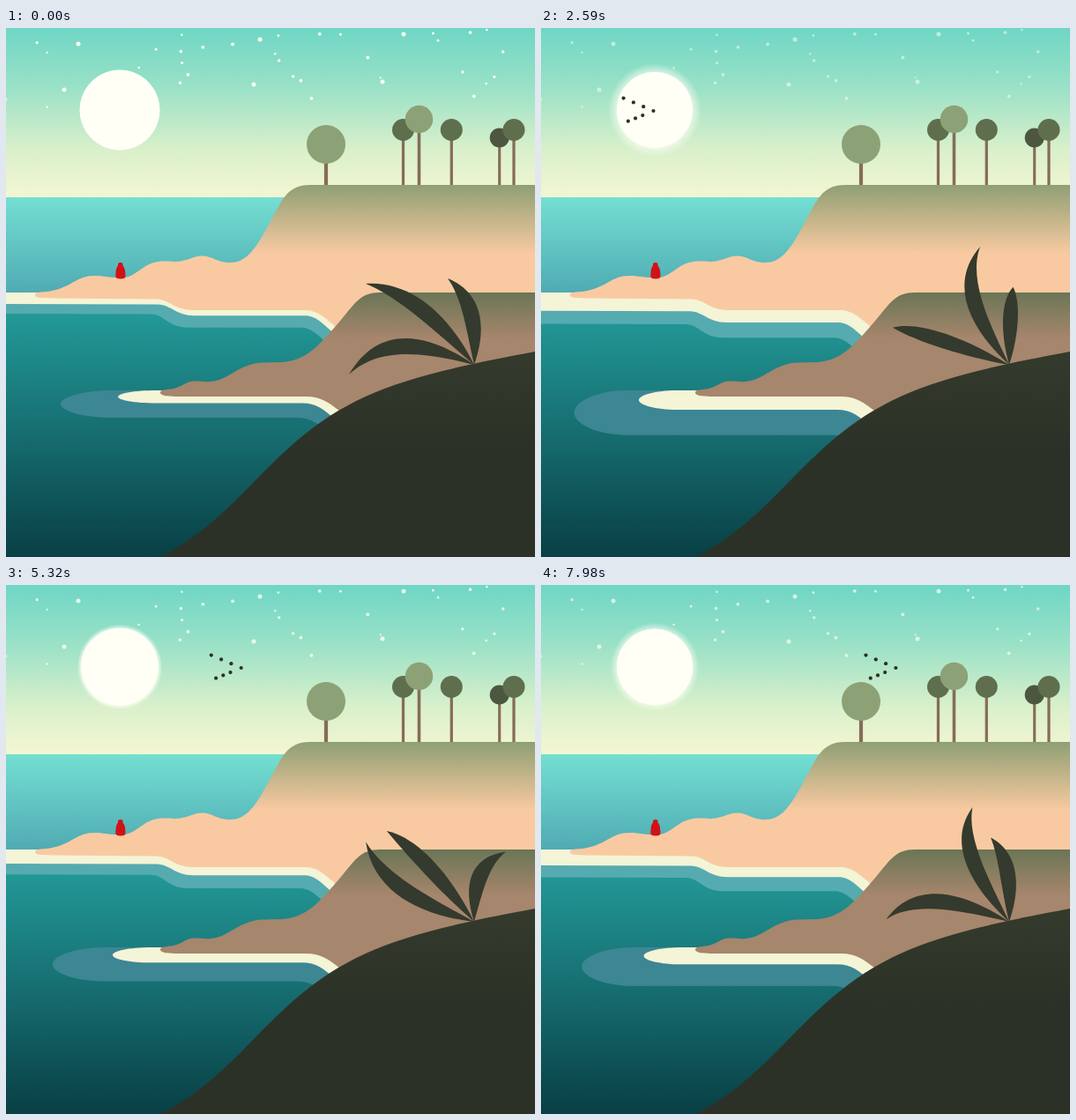
Animation, 600 px wide and 600 px high, one loop 8000 ms. Source, as an HTML page:

```html
<!DOCTYPE html>
<html lang="en">
<head>
<meta charset="utf-8">
<title>Evening coast</title>
<style>
  html, body { margin: 0; width: 100%; height: 100%; overflow: hidden; background: #0a4145; }
  svg { display: block; width: 100vw; height: 100vh; }
</style>
</head>
<body>
<svg viewBox="0 0 600 600">
  <defs>
    <linearGradient id="sky" gradientUnits="userSpaceOnUse" x1="0" y1="0" x2="0" y2="192">
      <stop offset="0" stop-color="#6fd6c5"/>
      <stop offset=".35" stop-color="#9ae1c7"/>
      <stop offset=".72" stop-color="#d9f0cb"/>
      <stop offset="1" stop-color="#f4f6d2"/>
    </linearGradient>
    <linearGradient id="farSea" gradientUnits="userSpaceOnUse" x1="0" y1="192" x2="0" y2="300">
      <stop offset="0" stop-color="#74dfd2"/>
      <stop offset="1" stop-color="#50abb3"/>
    </linearGradient>
    <linearGradient id="nearSea" gradientUnits="userSpaceOnUse" x1="0" y1="320" x2="0" y2="600">
      <stop offset="0" stop-color="#239a98"/>
      <stop offset=".5" stop-color="#166d70"/>
      <stop offset="1" stop-color="#083f44"/>
    </linearGradient>
    <linearGradient id="farLand" gradientUnits="userSpaceOnUse" x1="0" y1="178" x2="0" y2="256">
      <stop offset="0" stop-color="#8f9f74"/>
      <stop offset="1" stop-color="#f9caa1"/>
    </linearGradient>
    <linearGradient id="nearLand" gradientUnits="userSpaceOnUse" x1="0" y1="300" x2="0" y2="352">
      <stop offset="0" stop-color="#6b7556"/>
      <stop offset="1" stop-color="#a6866c"/>
    </linearGradient>
    <linearGradient id="hill" gradientUnits="userSpaceOnUse" x1="0" y1="366" x2="0" y2="480">
      <stop offset="0" stop-color="#343a2c"/>
      <stop offset="1" stop-color="#2c3127"/>
    </linearGradient>
    <radialGradient id="glow" gradientUnits="userSpaceOnUse" cx="129" cy="93" r="60">
      <stop stop-color="#fffff6"/>
      <stop id="glowIn" stop-color="#fffff6"/>
      <stop id="glowOut" stop-color="#fffff6" stop-opacity="0"/>
    </radialGradient>
  </defs>

  <rect width="600" height="193" fill="url(#sky)"/>
  <g id="stars" fill="#f7fff0"></g>
  <circle cx="129" cy="93" r="60" fill="url(#glow)"/>
  <circle id="sun" cx="129" cy="93" fill="#fffff6"/>
  <g id="birds" fill="#2c3127"></g>

  <rect y="192" width="600" height="109" fill="url(#farSea)"/>
  <rect y="300" width="600" height="300" fill="url(#nearSea)"/>
  <path id="farShallow" fill="#55abb0"/>
  <path id="farFoam" fill="#f4f4d7"/>
  <g id="trees"></g>
  <path fill="url(#farLand)" d="M33 303C33 299 40 300 50 298.500C75 294 80 281 100 281C112 281 118 284 133 283C150 282 155 265 178 264.500
    C190 264 192 266 200 264C210 262 215 258 224 258.500C235 259 238 266 255 266C275 266 286 245 300 219C313 196 318 178 345 178H600V420H400
    L372 337C360 328 354 320 338 320H212C190 320 186 307.500 170 307.500L50 306.500C38 306 33 306 33 303Z"/>
  <path fill="#d01217" d="M127 267.500Q127 266 129.800 266T132.500 267.500V269.500Q135.500 272 135.500 282Q135 284.500 130 284.500T124.300 282Q124.300 272 127 269.500Z"/>

  <path id="nearShallow" fill="#3d8694"/>
  <path id="nearFoam" fill="#f4f4d7"/>
  <path fill="url(#nearLand)" d="M175 413.500C175 410 182 410.500 190 409C200 407 204 400.500 214 400.500C224 400.500 227 402 236 400.500
    C254 397 268 379.500 292 379.500C310 379 314 380 325 377C346 372 360 354 380 331C396 312 402 300 424 300H600V480H420
    L378 434C366 425 358 418 340 418H200C188 418 175 418 175 413.500Z"/>
  <path fill="url(#hill)" d="M175 600C205 585 230 565 255 541C285 512 300 494 330 468C395 412 460 393 600 367V600Z"/>
  <g id="leaves" fill="#343a2d"></g>
</svg>

<script>
const $ = id => document.getElementById(id);
const add = (parent, tag, attrs) => {
  const node = document.createElementNS('http://www.w3.org/2000/svg', tag);
  for (const key in attrs) node.setAttribute(key, attrs[key]);
  return $(parent).appendChild(node);
};
const dot = (parent, cx, cy, r, fill) => add(parent, 'circle', fill ? { cx, cy, r, fill } : { cx, cy, r });

const LOOP = 8000, STEP = 70, ROOT = [531, 382];

// A few bright stars, and seeded faint ones that thin out towards the horizon
let seed = 7;
const random = () => (seed = seed * 16807 % 2147483647) / 2147483647;
for (const [x, y] of [[66, 70], [82, 18], [281, 64], [288, 13], [427, 61], [451, 7]]) dot('stars', x, y, 2.5);
for (let i = 0; i < 34; i++) dot('stars', random() * 600, 90 * random() ** 1.3, 1 + random());

// Two arms trail behind the leading bird
dot('birds', 0, 0, 2.1);
for (let i = 1; i <= 3; i++) {
  dot('birds', -11.3 * i, -4.8 * i, 2.1);
  dot('birds', -4 - 8.2 * i, 1.8 + 3.3 * i, 2.1);
}

const light = '#8da176', mid = '#5f6f4e', dark = '#4d5740';
function tree(x, y, r, fill) {
  const width = 2 + r / 10;
  add('trees', 'rect', { x: x - width / 2, y, width, height: 179 - y, fill: '#866c5a' });
  dot('trees', x, y, r, fill);
}
tree(363, 132, 22, light);
tree(450.5, 115.5, 12.5, mid);
tree(468.5, 103.5, 15.7, light);
tree(505.3, 115.5, 12.5, mid);
tree(559.7, 124.5, 11, dark);
tree(576, 115.5, 12.5, mid);

// Points of a leaf from its tip and how far it bows away from the straight line to the root
function pose(x, y, bow) {
  const dx = ROOT[0] - x, dy = ROOT[1] - y, length = Math.hypot(dx, dy);
  const at = (along, off) => [x + dx * along + dy / length * off, y + dy * along - dx / length * off];
  const edge = half => [at(.27, bow * 1.2 + half), at(.65, bow * .8 + half)];
  return [[x, y], ...edge(12), ...edge(-12)];
}

const leaves = [
  { period: 4200, rise: 1050, rest: pose(389, 393, 36), bent: pose(408.5, 289, -25) },
  { period: 6300, rise: 2100, rest: pose(408, 290, 19), bent: pose(510, 242.4, -34) },
  { period: 4200, rise: 1050, rest: pose(501, 284, 18), bent: pose(568.5, 303, -21) }
];
for (const leaf of leaves) leaf.node = add('leaves', 'path', {});

// Linear up over `rise`, linear back down over the rest of the period
const swing = (t, period, rise) => {
  const p = t % period;
  return p < rise ? p / rise : (period - p) / (period - rise);
};

function leafPath({ rest, bent }, k) {
  const [tip, a, b, c, d] = rest.map((point, i) => point.map((v, j) => v + (bent[i][j] - v) * k));
  return `M${tip}C${a} ${b} ${ROOT}C${d} ${c} ${tip}Z`;
}

// Strip of water along the far shore; y is its lower edge on the left
const shorePath = (y, drop, bend, end) =>
  `M0 300H120L400 320V${y + drop + 40}L${end + 36} ${y + drop + 22}C${end + 20} ${y + drop + 8} ${end + 14} ${y + drop} ${end} ${y + drop}` +
  `H${bend + 42}C${bend + 20} ${y + drop} ${bend + 16} ${y + 1} ${bend} ${y + .5}L0 ${y}Z`;

// Rounded tongue of water around the near spit
const tonguePath = (tip, round, bottom, end) => {
  const middle = (411 + bottom) / 2, pull = (bottom - 411) * .25;
  return `M220 411H${tip + round}C${tip + round * .42} 411 ${tip} ${middle - pull} ${tip} ${middle}` +
    `S${tip + round * .42} ${bottom} ${tip + round} ${bottom}H${end}` +
    `C${end + 16} ${bottom} ${end + 24} ${bottom + 7} ${end + 36} ${bottom + 17}L440 460V411Z`;
};

function draw(t) {
  const tide = swing(t, 6300, 3150);
  $('farFoam').setAttribute('d', shorePath(313 + 9.5 * tide, 13.2, 172 - 4 * tide, 338 - 3 * tide));
  $('farShallow').setAttribute('d', shorePath(324 + 14 * tide, 15.7, 164, 333 - 3 * tide));
  $('nearFoam').setAttribute('d', tonguePath(127 - 19.5 * tide, 44, 425.5 + 9 * tide, 336));
  $('nearShallow').setAttribute('d', tonguePath(62 - 29.5 * tide, 60, 442 + 24 * tide, 330));

  const soft = Math.min(1, tide * 2), core = 45.4 - 2.2 * soft;
  $('sun').setAttribute('r', core);
  $('glowIn').setAttribute('offset', (core - .5) / 60);
  $('glowIn').setAttribute('stop-opacity', 1 - .4 * soft);
  $('glowOut').setAttribute('offset', (45.6 + 9 * tide) / 60);
  $('stars').setAttribute('opacity', 1 - .55 * tide);

  $('birds').setAttribute('transform', `translate(${-4.6 + .051 * t} 94)`);
  for (const leaf of leaves) leaf.node.setAttribute('d', leafPath(leaf, swing(t, leaf.period, leaf.rise)));
}

const start = performance.now();
function tick() {
  const t = (performance.now() - start) % LOOP;
  draw(Math.floor(t / STEP) * STEP);
  requestAnimationFrame(tick);
}
tick();
</script>
</body>
</html>
```
